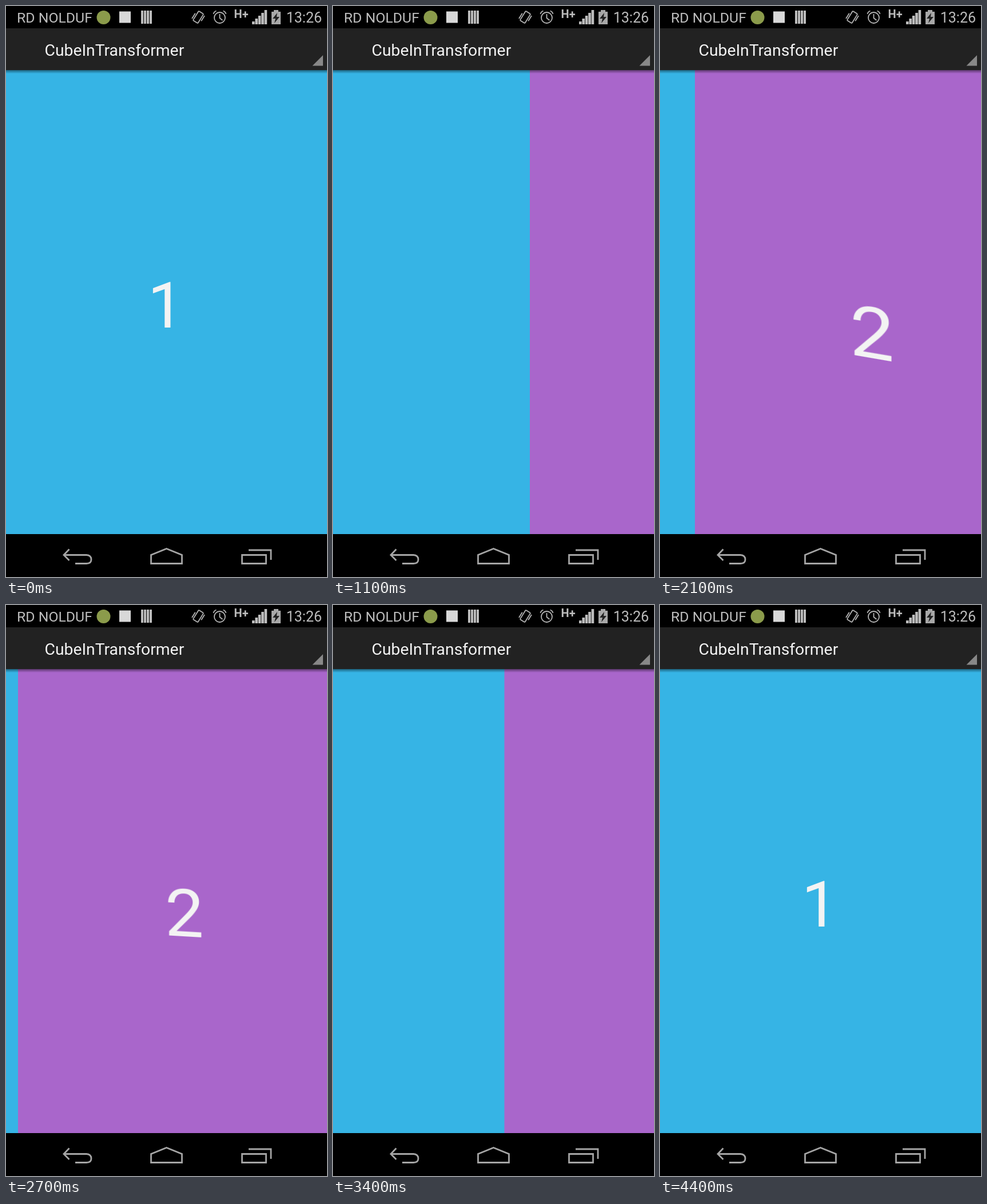
Recreate the animation shown at these times as an HTML page. Size 561 by 998 pixels, loop 4.7 s.

```html
<!DOCTYPE html>
<html lang="en">
<head>
<meta charset="utf-8">
<title>Cube page transition</title>
<style>
  html, body { margin: 0; width: 100%; height: 100%; overflow: hidden; background: #000; }
  body { position: relative; font-family: Roboto, sans-serif; }
  #pager {
    position: absolute; left: 0; top: 112px; width: 561px; height: 811px;
    overflow: hidden; background: #36b4e5;
  }
  #next { position: absolute; top: 0; left: 0; width: 561px; height: 811px; background: #a966cb; }
  .digit {
    position: absolute; top: 1px; left: 0; width: 561px; height: 810px;
    font-size: 112.2px; line-height: 821px; text-align: center; color: #f3f3f3;
  }
  #one { transform-origin: 100% 0; text-indent: -3px; }
  #two { transform-origin: 0 0; }
  #chrome { position: absolute; left: 0; top: 0; display: block; }
</style>
</head>
<body>
<div id="pager">
  <div id="next"></div>
  <div id="one" class="digit">1</div>
  <div id="two" class="digit">2</div>
</div>

<svg id="chrome" width="561" height="998" viewBox="0 0 561 998">
  <defs>
    <linearGradient id="shade" x1="0" y1="0" x2="0" y2="1">
      <stop offset="0" stop-color="#000" stop-opacity=".45"/>
      <stop offset="1" stop-color="#000" stop-opacity="0"/>
    </linearGradient>
  </defs>

  <!-- status bar -->
  <rect width="561" height="39" fill="#000"/>
  <g fill="#bdbdbd">
    <text x="19" y="28.5" font-size="24.8">RD NOLDUF</text>
    <text x="552" y="28.5" font-size="25" text-anchor="end">13:26</text>
    <text x="398.5" y="21" font-size="20" font-weight="700">H+</text>
    <path d="M236 8h4v23h-4zM241 8h4v23h-4zM246 8h4v23h-4zM251 8h4v23h-4z"/>
    <path d="M430 27h4.600v5h-4.600zM435.400 22h4.600v10h-4.600zM440.800 17h4.600v15h-4.600zM446.200 12h4.600v20h-4.600zM451.600 7h4.600v25h-4.600z"/>
    <path d="M468 7h8v3h4v22h-16V10h4z" fill="#a8a8a8"/>
  </g>
  <path d="M474 12l-8 10h5l-2 8 9-11h-5z" fill="#222"/>
  <circle cx="170.500" cy="20" r="12" fill="#8b9b4b"/>
  <rect x="198" y="9.500" width="20" height="20" fill="#d8d8d8"/>
  <g fill="none" stroke="#b4b4b4" stroke-width="1.800">
    <g transform="translate(336 19.500) rotate(32)">
      <rect x="-5" y="-9.500" width="10" height="19" rx="1.500"/>
      <path d="M-8 -3V8M8 -8V3"/>
    </g>
    <circle cx="373.500" cy="20.500" r="9.500"/>
    <path d="M373.500 14v7l5 4M362.500 14q1-4 5-5.500M384.500 14q-1-4-5-5.500"/>
  </g>

  <!-- action bar -->
  <rect y="39" width="561" height="73" fill="#222"/>
  <rect y="112" width="561" height="6" fill="url(#shade)"/>
  <text x="67.500" y="87" font-size="28.300" fill="#f3f3f3">CubeInTransformer</text>
  <path d="M554 86v18.500h-18.500z" fill="#888"/>

  <!-- navigation bar -->
  <rect y="923" width="561" height="75" fill="#000"/>
  <g fill="none" stroke="#a5a5a5" stroke-width="2.800">
    <path d="M110.500 949.500L101 959.500L110.500 969M101 959.500H140.500Q149 960 149 967.500Q149 974.500 140.500 974.500H121"/>
    <path d="M253.500 974.500V959.500L280.500 948.500L307.500 959.500V974.500Z"/>
    <path d="M412.500 959.500H454.500V974.500H412.500ZM424 951H463V968"/>
  </g>
</svg>

<script>
  const WIDTH = 561, DEPTH = 448.8, LOOP = 4700, STEP = 100;

  // [time in ms, x of the seam between the pages]
  const DRAG = [
    [0, 561], [300, 561], [400, 546], [500, 515], [700, 452], [1600, 209],
    [2100, 61], [2200, 34], [2300, 14], [2400, 5], [2500, 3], [2600, 8],
    [2700, 21], [2800, 50], [3400, 299.5], [3900, 454], [4000, 487],
    [4100, 517], [4200, 541], [4300, 556], [4400, 561], [LOOP, 561]
  ];

  const [next, one, two] = ["next", "one", "two"].map(id => document.getElementById(id));

  function seamAt(t) {
    const i = DRAG.findIndex(key => key[0] > t);
    const [t0, x0] = DRAG[i - 1], [t1, x1] = DRAG[i];
    return x0 + (x1 - x0) * (t - t0) / (t1 - t0);
  }

  function turn(el, x, angle) {
    el.style.visibility = Math.abs(angle) > 60 ? "hidden" : "visible";
    el.style.transform = `translateX(${x}px) perspective(${DEPTH}px) rotateY(${angle}deg)`;
  }

  function draw(t) {
    const seam = seamAt(Math.floor(t / STEP) * STEP);
    next.style.transform = `translateX(${seam}px)`;
    turn(one, seam - WIDTH, 90 * (1 - seam / WIDTH));
    turn(two, seam, -90 * seam / WIDTH);
  }

  const start = performance.now();
  function tick() {
    draw((performance.now() - start) % LOOP);
    requestAnimationFrame(tick);
  }
  tick();
</script>
</body>
</html>
```
